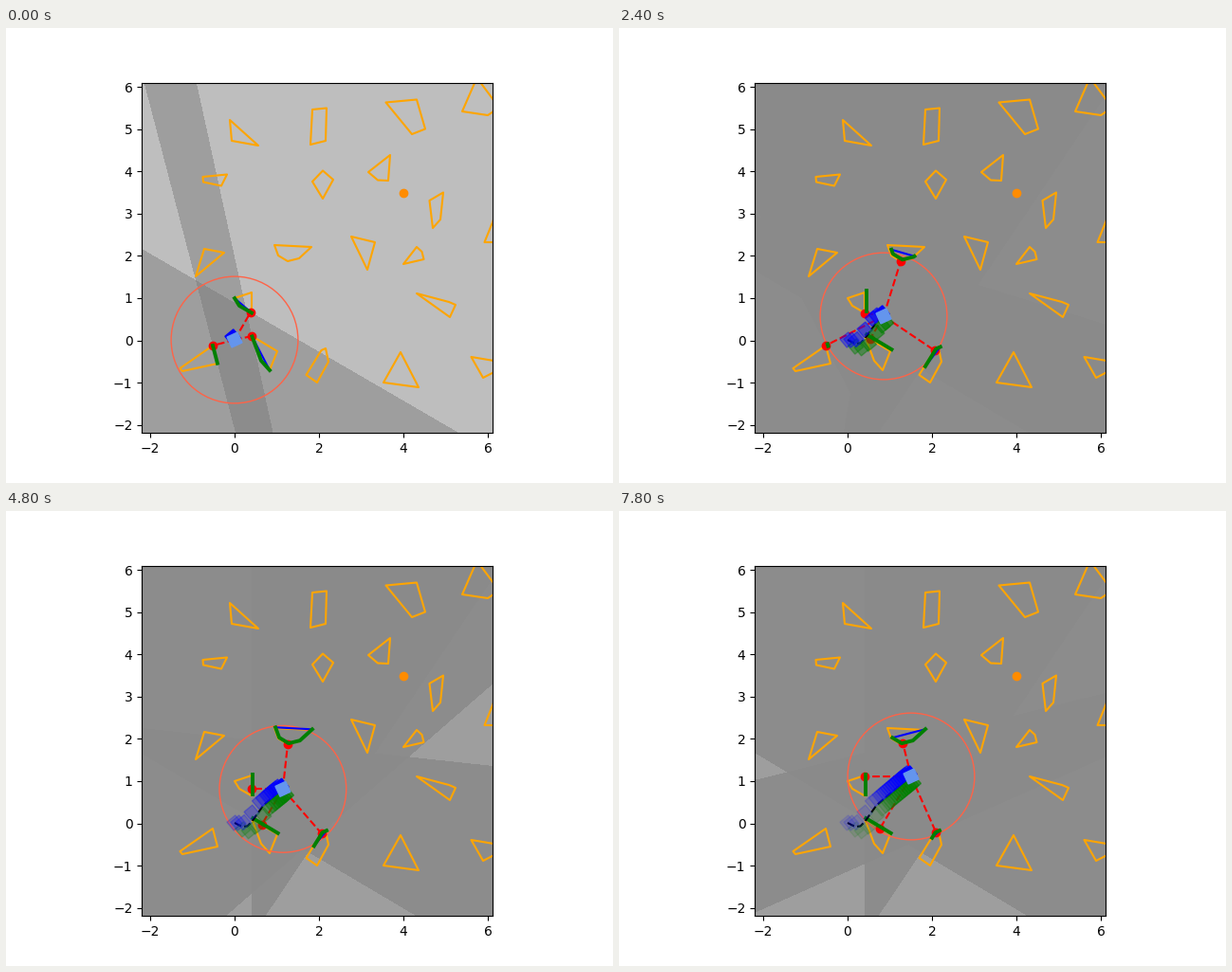
These frames come from a looping animation (640x480 px, 8000 ms). A matplotlib script:

```python
import numpy as np
import matplotlib.pyplot as plt
from matplotlib.animation import FuncAnimation
from matplotlib.colors import ListedColormap
from matplotlib.patches import Circle, Polygon

FRAMES, STEP_MS = 40, 200
LOW, HIGH = -2.19, 6.1
LEFT, BOTTOM, SIDE = 143.2, 427.2, 369.6   # axes box on the stage, px
SCALE = SIDE / (HIGH - LOW)
REACH = 69                                 # sensing radius, px
KEEP = 12                                  # step whose slab plane is kept

# Obstacle corners in stage pixels.
UPPER = [
    [(236, 97), (238, 119), (266, 124)],
    [(323, 86), (338, 84.5), (337, 119), (321, 123)],
    [(400.5, 78.5), (433, 75.5), (442, 106.5), (428, 112)],
    [(481, 88), (508, 92), (520, 84), (496.5, 52.5)],
    [(207.5, 157), (233, 154.5), (227, 166.5), (208, 162.5)],
    [(334, 150.5), (345, 160), (334, 180), (323, 162)],
    [(405, 134), (403, 161), (392, 160.5), (382, 152)],
    [(461, 173.5), (458, 202), (450, 211), (446.5, 182)],
    [(504.5, 226), (525, 226), (515, 200)],
    [(209, 233), (230, 237), (200, 262)],
]
SLAB = [(332.5, 340), (337, 338), (340, 352), (328, 374), (316.5, 366)]
LOWER = [
    [(283, 229), (322, 231), (309, 243), (297, 246), (287, 240)],
    [(364, 220), (389, 226), (381, 255)],
    [(433, 231), (438.5, 236), (440.5, 244), (419, 249)],
    [(433, 280), (467, 289), (474, 292), (468, 305)],
    [(241, 285), (259, 279), (259, 300.5), (246, 293)],
    [(183.5, 359), (218, 335), (223, 354), (186, 362)],
    [(259.3, 325), (286, 341), (278, 361), (269, 351)],
    [(416, 342), (435, 379), (398, 374)],
    [(490.5, 347), (532, 354), (503, 369)],
]


def world(points):
    """Stage pixels (y down) to map units."""
    p = np.asarray(points, float)
    return np.stack([(p[..., 0] - LEFT) / SCALE + LOW,
                     (BOTTOM - p[..., 1]) / SCALE + LOW], axis=-1)


# The robot turns away from its start, then walks steadily to the goal.
way_x = [241, 249, 254.5, 258.9, 271.5, 279, 308]
way_y = [329, 333, 332.5, 328, 310.5, 304, 280]
way_k = [0, 2, 4, 5, 8, 12, 39]
steps = np.arange(FRAMES)
robot = np.stack([np.interp(steps, way_k, way_x),
                  np.interp(steps, way_k, way_y)], axis=-1)
drift = np.diff(robot, axis=0, prepend=robot[:1])


class Obstacle:
    """Convex outline, sampled so that it can be sensed."""

    def __init__(self, corners, n=60):
        a = np.array(corners, float)
        edge = np.roll(a, -1, axis=0) - a
        t = np.arange(n)[:, None] / n
        self.points = (a[:, None] + t * edge[:, None]).reshape(-1, 2)
        normal = np.stack([-edge[:, 1], edge[:, 0]], axis=-1)
        inward = np.sum(normal * (a.mean(axis=0) - a), axis=1) > 0
        normal[inward] *= -1
        self.normals = np.repeat(normal, n, axis=0)

    def nearest(self, eye):
        return self.points[np.argmin(np.hypot(*(self.points - eye).T))]

    def visible(self, eye):
        """Points in reach on the sides that face the eye, in order."""
        ray = eye - self.points
        seen = (np.sum(ray * self.normals, axis=1) > 0) & (
            np.hypot(*ray.T) < REACH)
        start = np.argmax(seen & ~np.roll(seen, 1))
        return np.roll(self.points, -start, axis=0)[np.roll(seen, -start)]


slab = Obstacle(SLAB)
obstacles = [Obstacle(c) for c in UPPER + LOWER] + [slab]

fig = plt.figure(figsize=(6.4, 4.8), dpi=100)
ax = fig.add_subplot(aspect="equal", xlim=(LOW, HIGH), ylim=(LOW, HIGH))

grid = (np.arange(370) + 0.5) / 370 * SIDE
gx, gy = np.meshgrid(LEFT + grid, BOTTOM - SIDE + grid)
greys = ListedColormap([(g / 255,) * 3 for g in (255, 190, 158, 140, 138, 138)])
shade = ax.imshow(np.zeros_like(gx), cmap=greys, vmin=-0.5, vmax=5.5,
                  extent=(LOW, HIGH, LOW, HIGH), interpolation="nearest")

for corners in UPPER + LOWER + [SLAB]:
    ax.add_patch(Polygon(world(corners), fill=False, ec="orange", lw=1.5,
                         joinstyle="round", zorder=2))
ax.plot(4, 3.5, "o", color="darkorange", ms=6)
ring = ax.add_patch(Circle((0, 0), 1.5, fill=False, ec="tomato", lw=1,
                           zorder=2.5))
live = []


def half_plane(point, eye):
    """Cells on the eye's side of the line through the point."""
    nx, ny = eye - point
    return (gx - point[0]) * nx + (gy - point[1]) * ny >= 0


def line(points, *fmt, **style):
    live.extend(ax.plot(*world(points).T, *fmt, **style))


def square(center, side, degrees, color, alpha=1, zorder=6):
    turn = np.radians(degrees + 45 + 90 * np.arange(4))
    rim = np.stack([np.cos(turn), -np.sin(turn)], axis=-1)
    corners = np.asarray(center) + side / np.sqrt(2) * rim
    live.append(ax.add_patch(Polygon(world(corners), color=color, alpha=alpha,
                                     zorder=zorder)))


def foot(i):
    """Left feet fall on even steps, right feet on odd ones."""
    if i == 0:
        return robot[0], "blue"
    if i % 2:
        return robot[i] + (4.5, 5), "green"
    return robot[i] + (-4, -4), "blue"


def draw(k):
    while live:
        live.pop().remove()
    here = robot[k]
    ring.center = world(here)

    count = np.zeros(gx.shape, int)
    for ob in obstacles:
        near = ob.nearest(here)
        if np.hypot(*(near - here)) >= REACH:
            continue
        count += half_plane(near, here)
        line([here, near], "--", color="red", lw=1.5, zorder=3)
        line([near], "o", color="red", ms=6, zorder=3.2)
        hits = ob.visible(here) + drift[k]
        if len(hits):
            line(np.vstack([hits, hits[:1]]), color="blue", lw=1.5, zorder=4)
            line(hits, color="green", lw=2.8, zorder=4.2)
    if k >= KEEP:
        count += half_plane(slab.nearest(robot[KEEP]), robot[KEEP])
    shade.set_data(count)

    line(robot[:k + 1], "--", color="black", lw=1.5, zorder=5)
    for i in range(k):
        center, color = foot(i)
        square(center, 11.5, 40, color, 0.65 * np.exp((i - k) / 22))
    square(here + (-2, -3), 11.5, 40, "blue", zorder=6.5)
    square(here, 12, 25, "cornflowerblue", zorder=7)
    return live


anim = FuncAnimation(fig, draw, frames=FRAMES, interval=STEP_MS,
                     init_func=lambda: [], repeat=True, repeat_delay=0)
plt.show()
```
